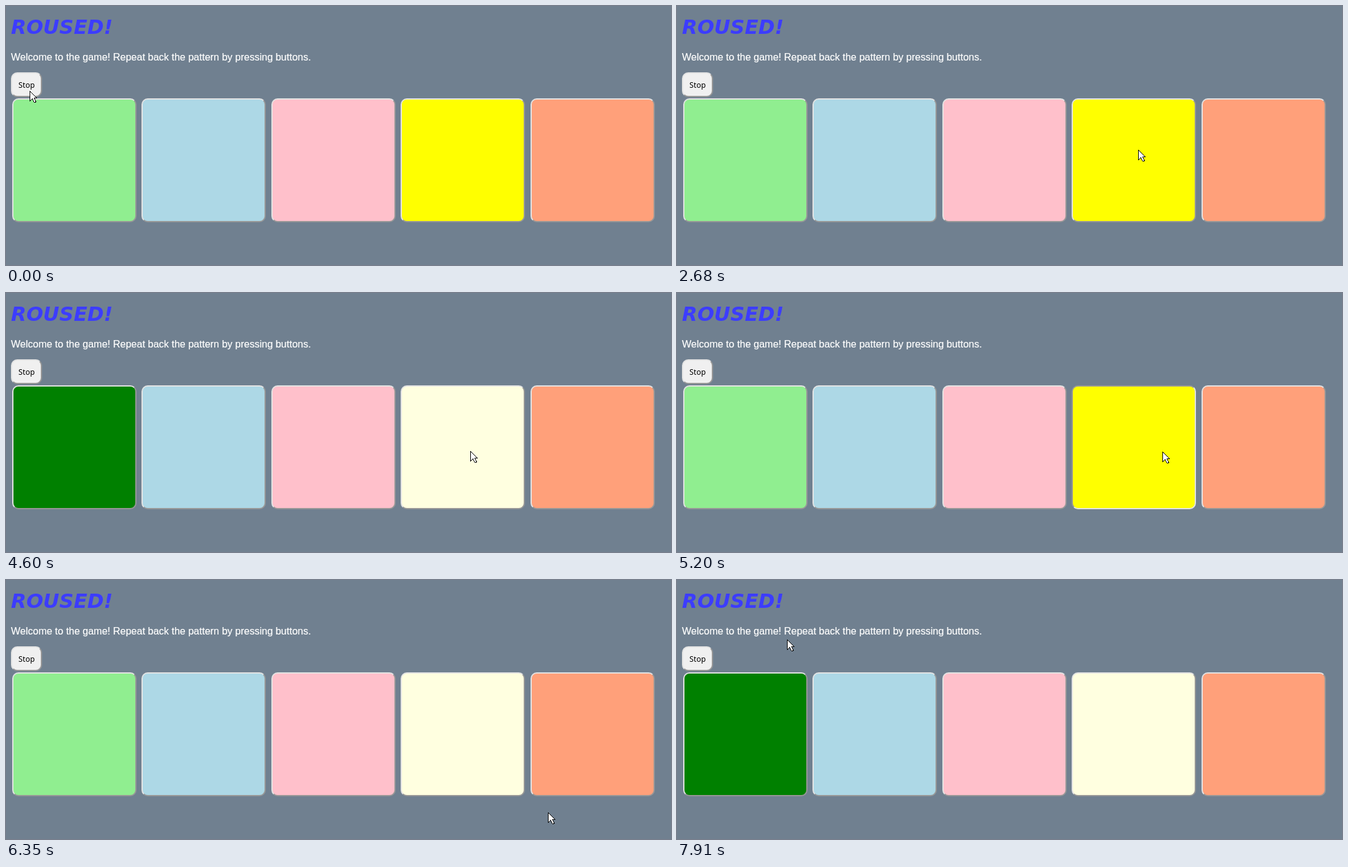
Write an HTML page that moves like this. It is 1070 px wide and 418 px high and loops after 8 s.

```html
<!DOCTYPE html>
<html lang="en">
<head>
<meta charset="utf-8">
<title>Pattern game</title>
<style>
  html, body { margin: 0; width: 100%; height: 100%; overflow: hidden; background: #708090; }
  .btn {
    position: absolute; box-sizing: border-box;
    border: 2px solid; border-color: #e3e3e3 #979797 #979797 #e3e3e3;
    border-radius: 10px;
  }
  .btn.down { border-color: #979797 #e3e3e3 #e3e3e3 #979797; }
  .pad { top: 149px; width: 200px; height: 200px; }
  .stop { left: 8px; top: 107px; width: 50px; height: 40px; background: #f0f0f0; }
  svg { position: absolute; left: 0; top: 0; z-index: 1; }
  .head { font: italic bold 32px "DejaVu Sans", sans-serif; fill: #3c3cff; }
  .intro { font: 16px "Liberation Sans", Arial, sans-serif; fill: #fff; stroke: #fff; stroke-width: .2; }
  .label { font: 12.3px "Noto Sans", sans-serif; fill: #000; }
</style>
</head>
<body>
<div class="btn stop"></div>
<svg width="1070" height="418" viewBox="0 0 1070 418">
  <text class="head" x="8" y="45">ROUSED!</text>
  <text class="intro" x="8" y="88">Welcome to the game! Repeat back the pattern by pressing buttons.</text>
  <text class="label" x="20" y="132">Stop</text>
  <path id="cursor" d="M.5 .5V16.5L4.5 12.5L7.2 18.5H9.2L10 17.5L7.5 11.5H11.5Z"
    fill="#fff" stroke="#000" shape-rendering="crispEdges"/>
</svg>
<script>
const LOOP = 8000;
const FRAME = 120;   // time between pointer steps
const PAUSE = 390;   // gap between two clues
const PITCH = 208.45;
const GREEN = 0, YELLOW = 3;

const pads = [
  ['lightgreen', 'green'],
  ['lightblue'],
  ['pink'],
  ['lightyellow', 'yellow'],
  ['lightsalmon']
].map(([idle, lit], i) => {
  const el = document.createElement('div');
  el.className = 'btn pad';
  el.style.left = Math.round(10 + i * PITCH) + 'px';
  document.body.append(el);
  return { el, idle, lit };
});

// The game plays its clues one after another.
const clues = (start, hold, ...order) => order.map((pad, i) => {
  const from = start + i * (hold + PAUSE);
  return { pad, from, to: from + hold };
});

const press = (pad, from, to) => ({ pad, from, to, down: true });

const lights = [
  ...clues(0, 820, YELLOW),
  ...clues(2440, 930, YELLOW, GREEN),
  press(YELLOW, 5080, 5320),
  press(GREEN, 5440, 5710),
  ...clues(6640, 610, YELLOW, GREEN)
];

// Pointer strokes: start time, number of steps, end point.
const home = [38, 137];
const strokes = [
  [420, 3, 634, 218], [820, 1, 731, 238],
  [2560, 2, 742, 232], [2800, 1, 735, 230], [3220, 1, 762, 236],
  [3520, 3, 753, 221], [4300, 2, 739, 255], [4600, 5, 781, 256],
  [5320, 1, 248, 252], [5440, 2, 142, 246], [5710, 2, 885, 387],
  [5990, 4, 872, 375], [7100, 1, 812, 185], [7250, 1, 763, 168],
  [7400, 4, 284, 40], [7910, 1, 177, 96]
];

function pointerAt(t) {
  let [x, y] = home;
  for (const [start, steps, endX, endY] of strokes) {
    if (t < start) break;
    const u = Math.min(1, (Math.floor((t - start) / FRAME) + 1) / steps);
    x += (endX - x) * u;
    y += (endY - y) * u;
  }
  return [Math.round(x), Math.round(y)];
}

const cursor = document.getElementById('cursor');

function draw(t) {
  pads.forEach(({ el, idle, lit }, i) => {
    const light = lights.find(l => l.pad === i && t >= l.from && t < l.to);
    el.style.background = light ? lit : idle;
    el.classList.toggle('down', Boolean(light && light.down));
  });
  cursor.setAttribute('transform', `translate(${pointerAt(t)})`);
}

const begin = performance.now();
function tick() {
  draw((performance.now() - begin) % LOOP);
  requestAnimationFrame(tick);
}
tick();
</script>
</body>
</html>
```
